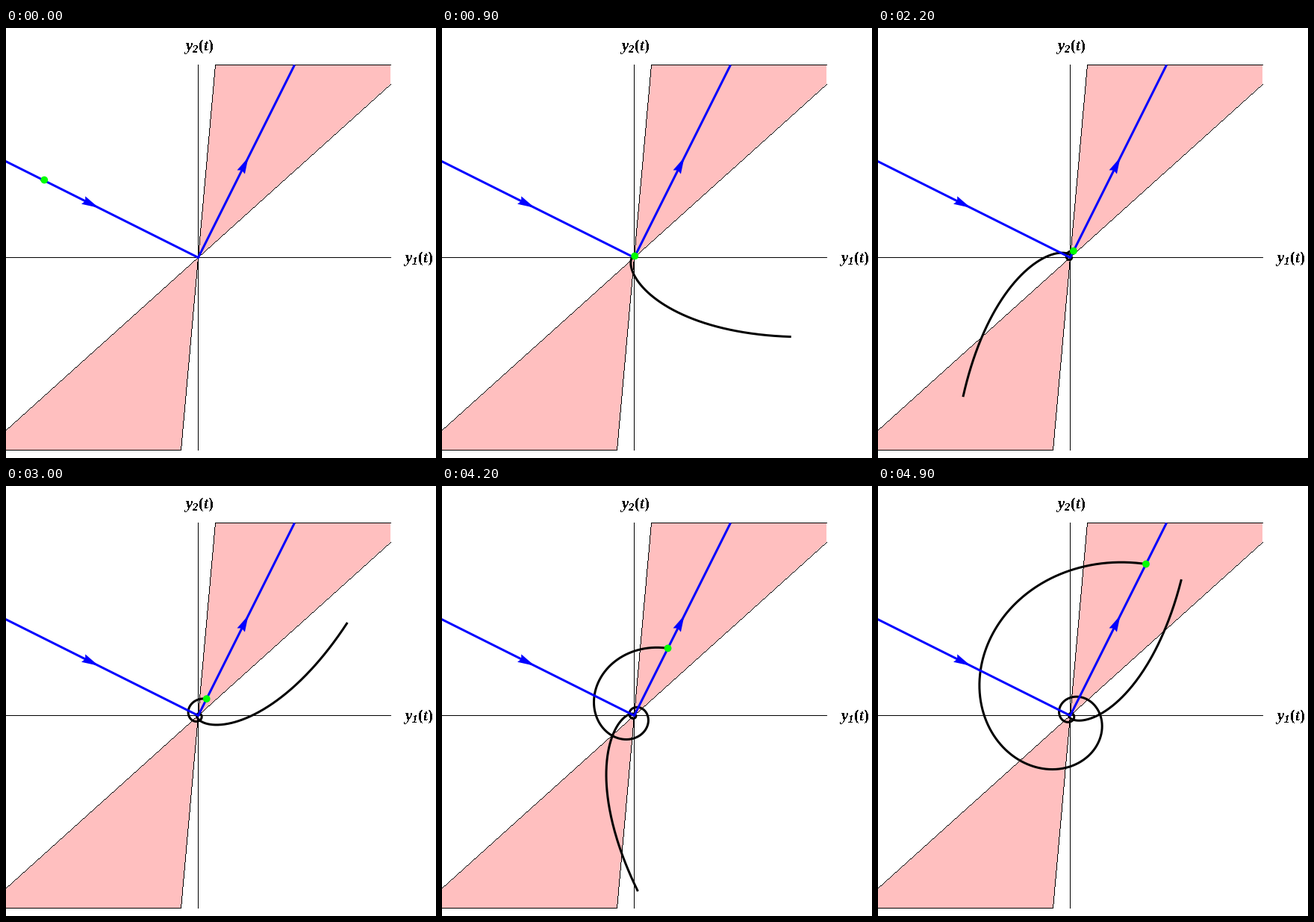
A matplotlib script that plays this animation: 576 by 576 pixels, repeating every 5200 ms.

```python
import numpy as np
import matplotlib.pyplot as plt
from matplotlib.animation import FuncAnimation
from matplotlib.collections import PolyCollection
from matplotlib.patches import Circle, Polygon

SIZE, DPI = 576, 100
PX = 72 / DPI  # points per pixel
FRAMES, MOVING, INTERVAL = 52, 50, 100

ORIGIN = np.array([257.5, 307.5])
LEFT, RIGHT, TOP, BOTTOM = -0.5, 515, 49.5, 565.5
STABLE, UNSTABLE = np.array([-2.0, 1.0]), np.array([1.0, 2.0])
DECAY, GROWTH, OMEGA = -13, 2, 6
AMP_STABLE, AMP_UNSTABLE = 105.3, 0.344
T_START, T_STEP = 0.0015, 0.058

plt.rcParams.update({
    "mathtext.fontset": "custom",
    "mathtext.bf": "Liberation Serif:bold",
    "mathtext.bfit": "Liberation Serif:italic:bold",
    "text.antialiased": False,
})


def to_stage(points):
    """Mathematical offsets (y up) to stage pixels (y down)."""
    return ORIGIN + np.asarray(points) * [1, -1]


def saddle(t):
    """Solution seen in the frame that rotates with the system."""
    t = np.asarray(t)[..., None]
    return (AMP_STABLE * np.exp(DECAY * t) * STABLE
            + AMP_UNSTABLE * np.exp(GROWTH * t) * UNSTABLE)


def trail_points(now):
    s = np.linspace(0, now, 1500)
    x, y = saddle(s).T
    angle = OMEGA * (now - s)
    c, d = np.cos(angle), np.sin(angle)
    return to_stage(np.column_stack([c * x - d * y, d * x + c * y]))


fig = plt.figure(figsize=(SIZE / DPI, SIZE / DPI), dpi=DPI, facecolor="white")
ax = fig.add_axes([0, 0, 1, 1])
ax.set(xlim=(0, SIZE), ylim=(SIZE, 0))
ax.axis("off")


def hairline(start, end):
    """Hard-edged line, one pixel per step along its longer direction."""
    start, end = np.floor(start), np.floor(end)
    steps = int(np.abs(end - start).max())
    pixels = np.floor(np.linspace(start, end, steps + 1) + 0.5)
    corners = np.array([(0, 0), (1, 0), (1, 1), (0, 1)])
    squares = PolyCollection(pixels[:, None] + corners, facecolors="black",
                             linewidths=0, zorder=2)
    squares.set_snap(False)
    ax.add_collection(squares, autolim=False)


def stroke(points, color, z):
    x, y = np.transpose(points)
    return ax.plot(x, y, color=color, lw=3 * PX, snap=False, zorder=z,
                   solid_capstyle="butt", solid_joinstyle="miter")[0]


def fill(points, color, z):
    ax.add_patch(Polygon(points, facecolor=color, edgecolor="none",
                         snap=False, zorder=z))


def arrow_head(tip, back, direction):
    """Notched head on a ray; tip and back are distances from the origin."""
    u = direction / np.hypot(*direction)
    n = np.array([-u[1], u[0]])
    notch = back + 0.12 * (tip - back)
    fill(to_stage([tip * u, back * u + 5.8 * n, notch * u, back * u - 5.8 * n]),
         "blue", 5)


# Cones where the distance from the origin grows
half_angle = np.arctan(np.sqrt(GROWTH / -DECAY))
axis_angle = np.arctan2(2, 1)
steep = 258 / np.tan(axis_angle + half_angle)
shallow = 258 * np.tan(axis_angle - half_angle)
for sign, side, level in ((1, RIGHT, TOP), (-1, LEFT, BOTTOM)):
    flat_edge = (side, ORIGIN[1] - sign * shallow)
    steep_edge = (ORIGIN[0] + sign * steep, level)
    fill([flat_edge, ORIGIN, steep_edge, (side, level)], "#ffbfbf", 1)
    hairline(ORIGIN, flat_edge)
    hairline(ORIGIN, steep_edge)
    hairline(steep_edge, (side, level))

hairline((LEFT, ORIGIN[1]), (RIGHT, ORIGIN[1]))
hairline((ORIGIN[0], TOP), (ORIGIN[0], BOTTOM))

stroke(to_stage([129.5 * STABLE, (0, 0), 129 * UNSTABLE]), "blue", 4)
arrow_head(149, 172, STABLE)
arrow_head(150, 128, UNSTABLE)

for index, x, y in ((2, 238, 30), (1, 532, 314)):
    label = (rf"$\mathbfit{{y}}_{{\mathbfit{{{index}}}}}"
             r"\mathbf{(}\mathbfit{t}\mathbf{)}$")
    ax.text(x, y, label, fontsize=21 * PX, ha="left", va="baseline")

trail = stroke([ORIGIN, ORIGIN], "black", 3)
dot = ax.add_patch(Circle(ORIGIN, 4.9, facecolor="lime", edgecolor="none",
                          zorder=6))


def update(i):
    now = T_START + T_STEP * min(i, MOVING - 1)
    trail.set_data(*trail_points(now).T)
    dot.center = to_stage(saddle(now))
    return trail, dot


anim = FuncAnimation(fig, update, frames=FRAMES, interval=INTERVAL,
                     repeat=True, repeat_delay=0)
plt.show()
```
